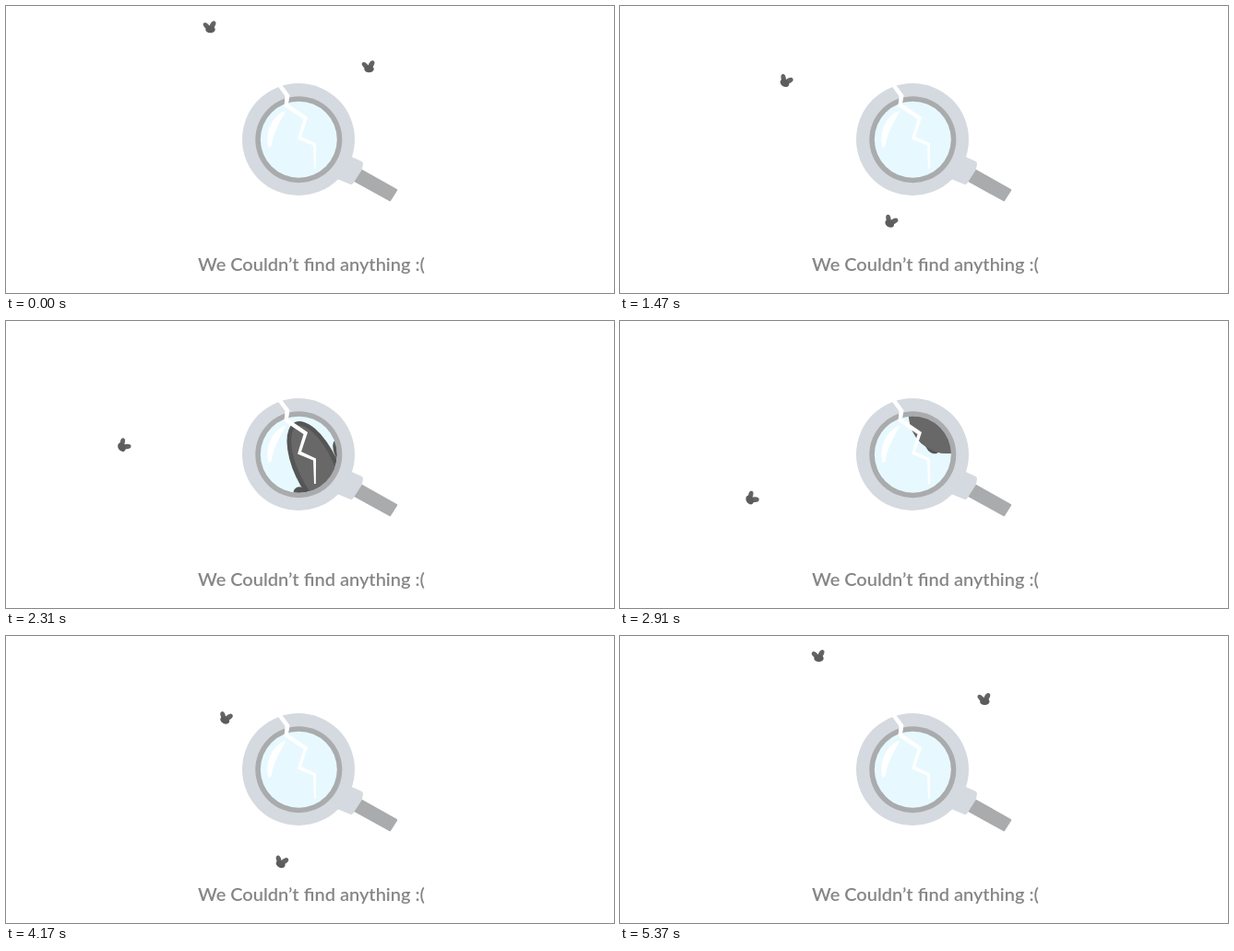
An HTML page that plays this animation: 659 by 312 pixels, repeating every 5400 ms.

```html
<!DOCTYPE html>
<html lang="en">
<head>
<meta charset="utf-8">
<title>Nothing found</title>
<style>
  html, body { margin: 0; width: 100%; height: 100%; overflow: hidden; background: #fff; }
  svg { display: block; width: 659px; height: 312px; }
  text { font: 600 20px Lato, "Open Sans", sans-serif; fill: #868686; text-anchor: middle; }
</style>
</head>
<body>
<svg viewBox="0 0 659 312">
  <defs>
    <clipPath id="glass"><circle cx="317.3" cy="145.2" r="41.5"/></clipPath>
    <g id="fly" fill="#646464">
      <ellipse cx="-3.5" cy="-1.2" rx="2.6" ry="4.5" transform="rotate(-45 -3.5 -1.2)"/>
      <ellipse cx="3" cy="-2.4" rx="2.8" ry="4.7" transform="rotate(28 3 -2.4)"/>
      <ellipse cx=".5" cy="2.4" rx="5.2" ry="3.9" fill="#5c5c5c"/>
    </g>
  </defs>

  <use id="flyA" href="#fly"/>
  <use id="flyB" href="#fly"/>

  <g stroke-linejoin="round">
    <path d="M384 178L423 200L416 211L378 190Z" fill="#a9abad" stroke="#a9abad" stroke-width="2.500"/>
    <path d="M374 167L384 171.500L383 177L374 191L362 186Z" fill="#d5d9e0" stroke="#d5d9e0" stroke-width="6"/>
  </g>
  <circle cx="317" cy="145" r="61" fill="#d5d9e0"/>
  <circle cx="317.3" cy="145.2" r="47" fill="#a9abad"/>
  <circle cx="317.3" cy="145.2" r="41.5" fill="#e7f9ff"/>

  <g clip-path="url(#glass)">
    <g id="big" fill="#555">
      <ellipse cx="-28" cy="22" rx="8" ry="11"/>
      <ellipse cx="32" cy="-2" rx="8" ry="16"/>
      <ellipse id="shell"/>
      <ellipse id="body" fill="#686868"/>
    </g>
  </g>

  <path d="M303.500 114C290 117 280 136 284.500 154L288 152C288 143 296 126 303.500 114Z" fill="#fff"/>
  <path d="M293 85L299 85.500L307.500 97L306 106.500L327 121L320 142L336 149.500L335.800 177L334 177L333 151.500L316 144.500L322.500 123L301.500 109L302.500 98Z" fill="#fff"/>
  <text x="331" y="288">We Couldn’t find anything :(</text>
</svg>

<script>
const LOOP = 5400, STEP = 30;
const $ = id => document.getElementById(id);

// Waypoints, evenly spaced in time around the loop
const routeA = [
  [221, 23], [279, 82], [226, 152], [257, 226], [290, 236],
  [329, 193], [327, 165], [328, 140], [341, 118], [354, 81],
  [300, 53], [263, 83], [219, 90], [173, 85], [146, 42]
];
const routeB = [
  [393, 66], [319, 56], [216, 72], [146, 97], [127, 143],
  [148, 200], [206, 230], [303, 244], [394, 158]
];

// Closed Catmull-Rom curve through the waypoints
function along(route, t) {
  const n = route.length, s = t / LOOP * n, i = Math.floor(s), u = s - i;
  const [p, a, b, q] = [-1, 0, 1, 2].map(k => route[(i + k + n) % n]);
  return [0, 1].map(k => a[k] + u / 2 * (b[k] - p[k]
    + u * (2 * p[k] - 5 * a[k] + 4 * b[k] - q[k] + u * (3 * (a[k] - b[k]) + q[k] - p[k]))));
}

function place(id, [x, y], turn) {
  $(id).setAttribute("transform", `translate(${x} ${y}) rotate(${turn})`);
}

function oval(id, rx, ry) {
  $(id).setAttribute("rx", rx);
  $(id).setAttribute("ry", ry);
}

// The magnified fly rises through the lens, rounds out and leaves at the right
function drawBig(t) {
  const u = (t - 2310) / 600, g = Math.min(1, Math.max(0, u));
  const rx = 24 + 18 * g, ry = 54 - 12 * g, rim = 5 * (1 - g);
  $("big").style.display = u > -0.95 && u < 1.7 ? "" : "none";
  place("big", [336 - 17 * u + 36 * u * u, 159 - 85 * u + 28 * u * u], -25);
  oval("shell", rx, ry);
  oval("body", rx - rim, ry - rim);
}

function draw(t) {
  const tilt = 30 - 30 * Math.cos(2 * Math.PI * t / LOOP);
  place("flyA", along(routeA, t), tilt);
  place("flyB", along(routeB, t), tilt);
  drawBig(t);
}

const start = performance.now();
function tick() {
  const t = (performance.now() - start) % LOOP;
  draw(Math.floor(t / STEP) * STEP);
  requestAnimationFrame(tick);
}
tick();
</script>
</body>
</html>
```
